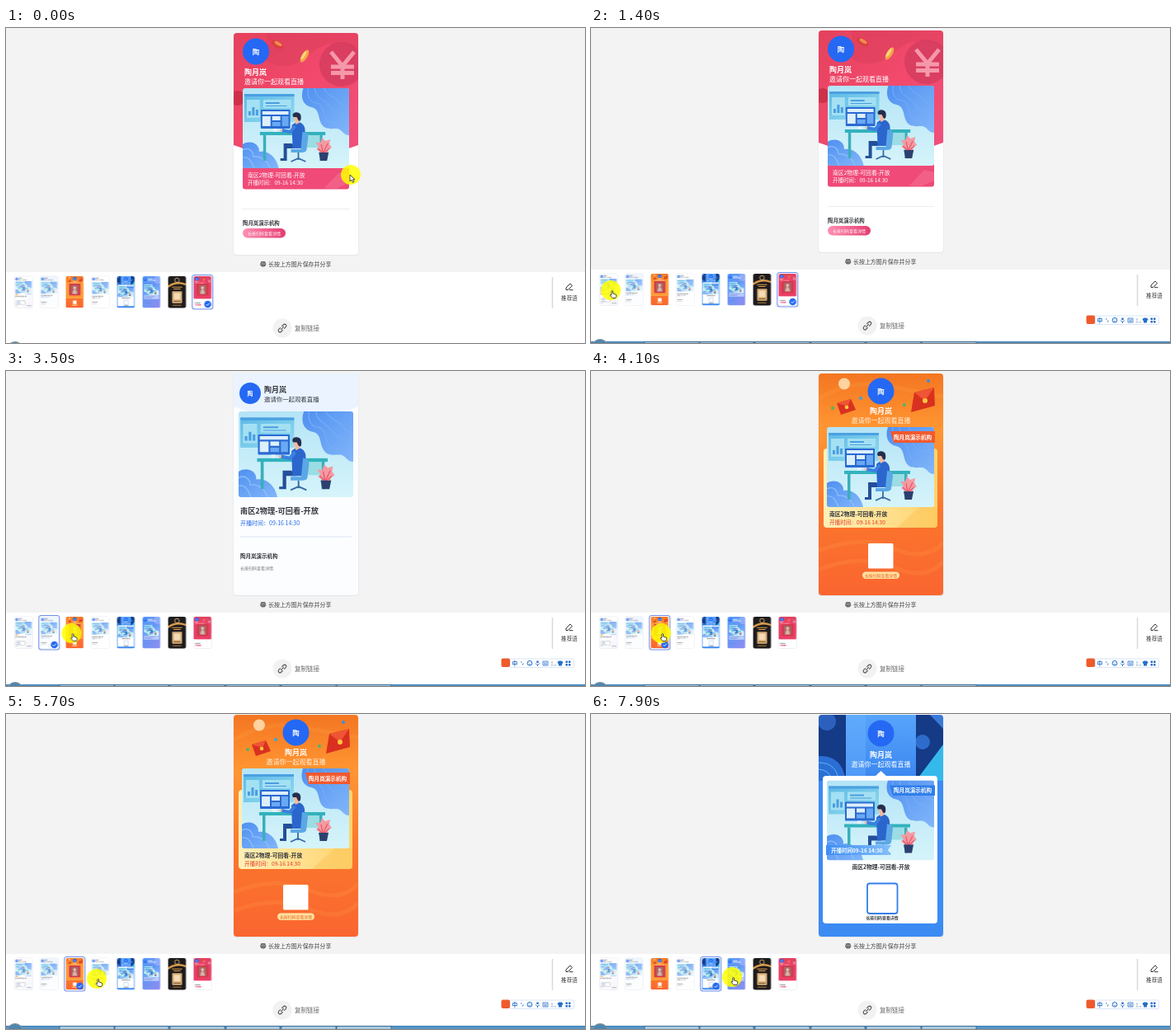
Animation, 702 px wide and 382 px high, one loop 8000 ms. Source, as an HTML page:

```html
<!DOCTYPE html>
<html lang="zh-CN">
<head>
<meta charset="utf-8">
<title>海报分享</title>
<style>
html, body { margin: 0; width: 100%; height: 100%; overflow: hidden; background: #fff; }
#stage { display: block; width: 702px; height: 382px; }
text { font-family: "Noto Sans CJK SC", "Noto Sans CJK", "Noto Sans", sans-serif; }
.b { font-weight: 700; }
.mid { text-anchor: middle; }
.w { fill: #fff; }
.ink { fill: #33353c; }
.page, .reel, .ring, .bar, .cur, .arrow, .hand, .click { animation: 8s step-end infinite; }
.page { animation-name: page; }
.reel { animation-name: reel; }
.ring { animation-name: ring; }
.bar { animation-name: bar; }
.arrow { animation-name: arrow; }
.hand { animation-name: hand; }
.click { animation-name: click; }
.cur { animation-name: cur; animation-timing-function: ease-in-out; }
@keyframes page {
  0% { transform: translateY(3px); }
  7% { transform: translateY(1px); }
  14% { transform: translateY(0); }
  62%, 100% { transform: translateY(-2px); }
}
@keyframes reel {
  0% { transform: translateX(0); }
  20% { transform: translateX(-200px); }
  37% { transform: translateX(-400px); }
  48.75% { transform: translateX(-600px); }
  73% { transform: translateX(-800px); }
  84%, 100% { transform: translateX(-1000px); }
}
@keyframes ring {
  0% { transform: translateX(238.3px); }
  20% { transform: translateX(21.3px); }
  37% { transform: translateX(52.3px); }
  48.75% { transform: translateX(83.3px); }
  73% { transform: translateX(114.3px); }
  84%, 100% { transform: translateX(145.3px); }
}
@keyframes bar { 0% { opacity: 0; } 8%, 100% { opacity: 1; } }
@keyframes arrow { 0% { opacity: 1; } 15%, 100% { opacity: 0; } }
@keyframes hand { 0% { opacity: 0; } 15%, 100% { opacity: 1; } }
@keyframes click {
  0%, 20.5%, 36.8%, 48.7%, 74%, 84% { opacity: 0; }
  18.5%, 34.4%, 46.7%, 72%, 82.2% { opacity: 1; }
  100% { opacity: 0; }
}
@keyframes cur {
  0%, 2% { transform: translate(418px, 178px); }
  16%, 21% { transform: translate(24px, 318px); }
  33%, 38% { transform: translate(51px, 318px); }
  46%, 64% { transform: translate(85px, 318px); }
  70%, 74% { transform: translate(110px, 321px); }
  82%, 94.5% { transform: translate(145px, 320px); }
  98%, 100% { transform: translate(171px, 319px); }
}
</style>
</head>
<body>
<svg id="stage" viewBox="0 0 702 382" width="702" height="382">
<defs>
  <linearGradient id="sky" x2="0" y2="1"><stop stop-color="#b4e4f7"/><stop offset="1" stop-color="#d6f4fa"/></linearGradient>
  <linearGradient id="blob" x2="1" y2="1"><stop stop-color="#4f90f0"/><stop offset="1" stop-color="#82b6fa"/></linearGradient>
  <linearGradient id="board" x2="1" y2="1"><stop stop-color="#5db9e6"/><stop offset="1" stop-color="#93dcef"/></linearGradient>
  <linearGradient id="rose" x2="1" y2="1"><stop stop-color="#e5415c"/><stop offset=".5" stop-color="#f2496c"/><stop offset="1" stop-color="#f0507c"/></linearGradient>
  <linearGradient id="pill"><stop stop-color="#ff8fb3"/><stop offset="1" stop-color="#e53b70"/></linearGradient>
  <linearGradient id="pale" x2="1" y2="1"><stop stop-color="#fbfbff"/><stop offset=".5" stop-color="#fff"/><stop offset="1" stop-color="#f0f0fc"/></linearGradient>
  <linearGradient id="sun" x2="0" y2="1"><stop stop-color="#f47622"/><stop offset=".25" stop-color="#ff9632"/><stop offset=".62" stop-color="#fb762c"/><stop offset="1" stop-color="#fa6530"/></linearGradient>
  <linearGradient id="gold" x2="1"><stop stop-color="#fff0b8"/><stop offset="1" stop-color="#ffd36c"/></linearGradient>
  <linearGradient id="blue" x2="0" y2="1"><stop stop-color="#57a4fb"/><stop offset="1" stop-color="#3a86f0"/></linearGradient>
  <linearGradient id="tag"><stop stop-color="#3d8df5"/><stop offset="1" stop-color="#83bffb"/></linearGradient>
  <linearGradient id="iris" x2="1" y2="1"><stop stop-color="#4f9bf8"/><stop offset="1" stop-color="#8f8df0"/></linearGradient>
  <linearGradient id="task" x2="0" y2="1"><stop stop-color="#3f7fb2"/><stop offset=".3" stop-color="#5b9aca"/><stop offset="1" stop-color="#2c6a9f"/></linearGradient>
  <clipPath id="card"><rect width="151" height="269" rx="4"/></clipPath>
  <clipPath id="thumb"><rect width="151" height="269" rx="16"/></clipPath>
  <clipPath id="frame"><rect width="130" height="97" rx="3"/></clipPath>

  <symbol id="art" viewBox="0 0 130 97" preserveAspectRatio="none">
   <g clip-path="url(#frame)">
    <rect width="130" height="97" fill="url(#sky)"/>
    <path d="M74 0C70 12 74 21 84 23C93 25 92 33 95 41C99 51 108 49 114 49C122 49 122 57 130 57V0Z" fill="url(#blob)"/>
    <path d="M80 0C78 12 84 18 91 18C100 20 97 32 103 39C109 46 119 40 130 48M88 0C88 12 100 13 106 22C112 32 121 28 130 36M99 0C102 9 114 10 118 17S126 23 130 23" fill="none" stroke="#78aef7" stroke-width="1"/>
    <path d="M0 68C10 62 21 68 20 77C33 75 42 86 44 97H0Z" fill="url(#blob)"/>
    <path d="M0 75C8 71 13 77 13 83C24 82 31 90 33 97M0 84Q9 82 14 97" fill="none" stroke="#8fbffa" stroke-width="1.2"/>
    <rect x="2" y="7" width="61" height="34" fill="url(#board)"/>
    <path d="M2 7H63V10H2Z" fill="#4ba0e2"/>
    <path d="M5 14H21V36H5ZM25 14H59V24H25Z" fill="#a4e0f3"/>
    <path d="M7 33V28h3v5ZM11.500 33V23h3v10ZM16 33V26h3v7ZM28 17H45V19H28ZM28 21H54V22H28Z" fill="#4a9ee0"/>
    <rect x="22" y="26" width="36" height="23" rx="1" fill="#2b6ad2"/>
    <path d="M24 28H56V32H24ZM24 34H34V46H24ZM36 34H46V39H36Z" fill="#dceffc"/>
    <path d="M36 41H46V46H36ZM48 34H56V46H48Z" fill="#69a9f3"/>
    <path d="M37 49H42V53H47V54H32V53H37Z" fill="#e3f1fa"/>
    <path d="M25 57H28.500V88H25ZM94 57H97.500V88H94Z" fill="#3aaebb"/>
    <path d="M78 57H94V72H78Z" fill="#9bdde4"/>
    <rect x="21" y="53" width="80" height="4" fill="#32b2bd"/>
    <path d="M68 78V87M59 89L68 85L77 89" fill="none" stroke="#376ba5" stroke-width="1.8"/>
    <path d="M60 67H50V85H46V88H54V73H66Z" fill="#244f9a"/>
    <path d="M60 45C65 39 74 40 76 49L77 73H61Z" fill="#2b66cd"/>
    <path d="M64 46L58 53L48 51" fill="none" stroke="#3b80e2" stroke-width="4"/>
    <circle cx="47" cy="51" r="1.600" fill="#f3b8a0"/>
    <path d="M62 35H69V42L65 44Z" fill="#f3b8a0"/>
    <path d="M61 33C61 28 70 28 71 33C72 39 70 41 68 39L66 35H62Z" fill="#252e4e"/>
    <path d="M73 53Q80 53 80 59L78 75Q77 78 72 78H59V74H71Z" fill="#5ba7e6"/>
    <path d="M98 80L90 74L93 71L89 66L95 66L97 60L101 64L107 62L106 68L109 72L104 75L105 79Z" fill="#f59aa2"/>
    <path d="M98 79L96 68M98 79L104 67M98 79L92 73M99 79L106 73" stroke="#e8596b" stroke-width="1.300"/>
    <path d="M93 78H105L103 88H95Z" fill="#2c4070"/>
   </g>
  </symbol>

  <g id="face"><circle r="16" fill="#2468f4"/><text class="b w mid" y="3.100" font-size="8.500">陶</text></g>

  <g id="p8" clip-path="url(#card)">
    <rect width="151" height="269" fill="#fff"/>
    <path d="M0 0H151V136Q76 166 0 136Z" fill="url(#rose)"/>
    <path d="M40 0H151V22Q118 2 92 26T40 34Z" fill="#d03a58" opacity=".35"/>
    <circle cx="131" cy="38" r="27" fill="#d63d60" opacity=".85"/>
    <path d="M118 23L132 40L146 23M132 39V56M118 41H146M118 48.500H146" fill="none" stroke="#f598aa" stroke-width="5"/>
    <circle cx="5" cy="79" r="9" fill="#cf3049"/>
    <ellipse cx="53" cy="14" rx="8" ry="4" fill="#d8403f" transform="rotate(30 53 14)"/>
    <ellipse cx="54" cy="13" rx="5" ry="2" fill="#f08c50" transform="rotate(30 54 13)"/>
    <ellipse cx="86" cy="28" rx="8.500" ry="3.500" fill="#f2a648" transform="rotate(-58 86 28)"/>
    <ellipse cx="85" cy="27" rx="6" ry="1.700" fill="#ffd477" transform="rotate(-58 85 27)"/>
    <use href="#face" x="27" y="22.500"/>
    <text class="b w" x="13" y="50.500" font-size="9">陶月岚</text>
    <text class="w" x="13" y="62" font-size="8">邀请你一起观看直播</text>
    <path d="M11 160H140V186.500Q140 189.500 137 189.500H14Q11 189.500 11 186.500Z" fill="#f04a78"/>
    <use href="#art" x="11" y="67" width="129" height="97"/>
    <path d="M110 188L128 169L140 172V182L124 189Z" fill="#f98aa3" opacity=".35"/>
    <text class="w" x="17" y="174.800" font-size="6.800">南区2物理-可回看-开放</text>
    <text class="w" x="17" y="184.200" font-size="6.500">开播时间：09-16 14:30</text>
    <path d="M11 213.500H140" stroke="#e3e5ea" stroke-width=".7"/>
    <text class="b ink" x="11" y="232.500" font-size="6.400">陶月岚演示机构</text>
    <rect x="11" y="237" width="52" height="11.500" rx="5.700" fill="url(#pill)"/>
    <text class="w mid" x="37" y="244.600" font-size="5">长按扫码查看详情</text>
  </g>

  <g id="p1" clip-path="url(#card)">
    <rect width="151" height="269" fill="url(#pale)"/>
    <path d="M0 160Q12 190 0 215ZM151 140Q112 180 151 205Z" fill="#f3f4fd"/>
    <use href="#face" transform="translate(18.500 24) scale(.81)"/>
    <text class="b ink" x="34.500" y="23" font-size="9">陶月岚</text>
    <text class="ink" x="34.500" y="33.700" font-size="7.400">邀请你一起观看直播</text>
    <use href="#art" x="6" y="42" width="139" height="104"/>
    <rect x="6" y="150.500" width="23.500" height="8.500" rx="1" fill="#fb8b1e"/>
    <text class="b w" x="8.500" y="156.800" font-size="5.500">• LIVE</text>
    <text class="b" x="145" y="156.900" font-size="4.800" fill="#2d6ce0" text-anchor="end">来自「陶月岚演示机构」</text>
    <text class="b ink" x="6" y="175.300" font-size="9.200">南区2物理-可回看-开放</text>
    <path d="M13 207H86L90 211V237L87 240" fill="none" stroke="#222" stroke-width="1.200"/>
    <path d="M13 209.500H85L87.500 212V238L85 241H14L10 244V212Z" fill="#fff" stroke="#222"/>
    <text class="b" x="17" y="223.300" font-size="7.500" fill="#2468e8">开播时间：</text>
    <text class="b ink" x="17" y="234.400" font-size="6.500">09-16 14:30</text>
    <path d="M17 250.500H92" stroke="#dfe1e8"/>
    <path d="M17 250.500H28.500" stroke="#222" stroke-width="1.600"/>
    <circle cx="12.500" cy="250.500" r="2.800" fill="#fff" stroke="#222"/><circle cx="12.500" cy="250.500" r="1" class="ink"/>
    <text class="b ink mid" x="122" y="252.400" font-size="4.900">长按扫码查看详情</text>
  </g>

  <g id="p2" clip-path="url(#card)">
    <rect width="151" height="269" fill="#fbfdff"/>
    <path d="M0 0H151V40Q80 70 0 40Z" fill="#eaf3ff"/>
    <use href="#face" transform="translate(20 24) scale(.81)"/>
    <text class="b ink" x="37" y="23" font-size="9">陶月岚</text>
    <text class="ink" x="37" y="34" font-size="7.400">邀请你一起观看直播</text>
    <use href="#art" x="6" y="46" width="139" height="104"/>
    <text class="b ink" x="8" y="170" font-size="9.200">南区2物理-可回看-开放</text>
    <text x="8" y="184" font-size="7" fill="#2468e8">开播时间：09-16 14:30</text>
    <path d="M8 198H143" stroke="#dce6f5"/>
    <text class="b ink" x="8" y="224" font-size="6.500">陶月岚演示机构</text>
    <text x="8" y="238" font-size="5" fill="#777">长按扫码查看详情</text>
  </g>

  <g id="p3" clip-path="url(#card)">
    <rect width="151" height="269" fill="url(#sun)"/>
    <path d="M0 30Q40 8 75 14T151 28M0 215Q50 195 90 212T151 205M0 238Q50 218 90 235T151 228" fill="none" stroke="#ffab55" stroke-width="5" opacity=".15"/>
    <circle cx="31" cy="12.500" r="7" fill="#ffd2a0"/>
    <path d="M22 36L39 31L45 44L27 50ZM116 23L140 17L141 39L112 47Z" fill="#d9301f"/>
    <path d="M22 36L35 40L39 31ZM116 23L129 33L140 17Z" fill="#ef5534"/>
    <circle cx="34" cy="41" r="2.300" fill="#ffc543"/><circle cx="129" cy="33" r="3" fill="#ffc543"/>
    <circle cx="51" cy="30" r="2" fill="#36a7e0"/><circle cx="104" cy="38" r="2" fill="#4cb66c"/>
    <circle cx="133" cy="9" r="2" fill="#398de0"/><circle cx="17" cy="42" r="2" fill="#4cb66c"/>
    <use href="#face" x="75.500" y="21.500"/>
    <text class="b w mid" x="75.500" y="48.500" font-size="9">陶月岚</text>
    <text class="mid" x="75.500" y="60" font-size="8" fill="#fff0dc">邀请你一起观看直播</text>
    <rect x="6" y="91" width="138" height="96" rx="4" fill="url(#gold)"/>
    <path d="M95 187L122 162H144V183Q144 187 140 187Z" fill="#fbbd50" opacity=".4"/>
    <use href="#art" x="10" y="65" width="130" height="97"/>
    <path d="M87 70H141V84H91Z" fill="#f2592e"/>
    <text class="b w" x="91" y="79.500" font-size="6.600">陶月岚演示机构</text>
    <text class="b ink" x="13" y="172.600" font-size="6.800">南区2物理-可回看-开放</text>
    <text x="13" y="182.500" font-size="6.600" fill="#e23a24">开播时间：09-16 14:30</text>
    <rect x="60" y="206" width="30.500" height="30.500" rx="1.500" fill="#fff"/>
    <rect x="53" y="240.500" width="45" height="8.500" rx="4.200" fill="#ffe3a2"/>
    <text class="mid" x="75.500" y="246.600" font-size="4.900" fill="#e8601f">长按扫码查看详情</text>
  </g>

  <g id="p4" clip-path="url(#card)">
    <rect width="151" height="269" fill="#fff"/>
    <use href="#face" transform="translate(19 24) scale(.81)"/>
    <text class="b ink" x="36" y="23" font-size="9">陶月岚</text>
    <text class="ink" x="36" y="34" font-size="7.400">邀请你一起观看直播</text>
    <use href="#art" x="6" y="48" width="139" height="104"/>
    <text class="b ink" x="7" y="172" font-size="9.200">南区2物理-可回看-开放</text>
    <text class="ink" x="7" y="186" font-size="7">开播时间：09-16 14:30</text>
    <path d="M7 198H144" stroke="#ccc" stroke-dasharray="2 2"/>
    <text class="b ink" x="7" y="226" font-size="6.500">陶月岚演示机构</text>
    <text x="7" y="239" font-size="5" fill="#777">长按扫码查看详情</text>
  </g>

  <g id="p5" clip-path="url(#card)">
    <rect width="151" height="269" fill="#3c8bf3"/>
    <path d="M0 0H33V80H0ZM118 0H151V80H118Z" fill="#153a86"/>
    <path d="M0 50Q28 48 33 80H0Z" fill="#2a6fd6"/>
    <path d="M0 58Q22 58 24 80M0 66Q14 67 16 80" fill="none" stroke="#68b2f4"/>
    <circle cx="10" cy="8" r="11" fill="#2b61bd"/>
    <circle cx="126" cy="33" r="9" fill="#2d6ccb"/>
    <path d="M151 36V80H118Z" fill="#35b9ed"/>
    <path d="M135 0H151V17Z" fill="#3979d9"/>
    <rect x="33" width="85" height="80" fill="url(#blue)"/>
    <path d="M33 0H57V80H33Z" fill="#6fb4ff" opacity=".4"/>
    <use href="#face" x="75.500" y="22.500"/>
    <text class="b w mid" x="75.500" y="51.700" font-size="9">陶月岚</text>
    <text class="w mid" x="75.500" y="62.800" font-size="8">邀请你一起观看直播</text>
    <path d="M9 74H69L75.500 68L82 74H140Q144 74 144 78V249Q144 253 140 253H9Q5 253 5 249V78Q5 74 9 74Z" fill="#fff"/>
    <use href="#art" x="10" y="79.500" width="130" height="97"/>
    <path d="M86 85.500H141V98H90Z" fill="#2f7eea"/>
    <text class="b w" x="91" y="94.200" font-size="6.600">陶月岚演示机构</text>
    <path d="M9 158H88L84 164L88 170H9Z" fill="url(#tag)"/>
    <text class="b w" x="15" y="166.600" font-size="6.500">开播时间09-16 14:30</text>
    <text class="b ink mid" x="75.500" y="187" font-size="6.800">南区2物理-可回看-开放</text>
    <rect x="59" y="204.500" width="36.500" height="36.500" rx="3" fill="#fff" stroke="#347fe9" stroke-width="1.800"/>
    <text class="b ink mid" x="77" y="248" font-size="4.900">长按扫码查看详情</text>
  </g>

  <g id="p6">
    <rect width="151" height="269" fill="url(#iris)"/>
    <circle cx="130" cy="30" r="35" fill="#a9c4ff" opacity=".5"/>
    <use href="#face" transform="translate(22 28) scale(.9)"/>
    <path d="M45 23H85M45 35H112" stroke="#fff" stroke-width="5"/>
    <use href="#art" x="11" y="70" width="129" height="92"/>
    <rect x="11" y="162" width="129" height="32" fill="#b9cdfb"/>
    <path d="M18 174H100M18 184H80M18 228H72" stroke="#6e83dc" stroke-width="4"/>
  </g>

  <g id="p7">
    <rect width="151" height="269" fill="#1d1b1c"/>
    <path d="M0 78Q75 30 151 62V78Q75 48 0 98Z" fill="#d99a4b"/>
    <circle cx="75" cy="34" r="19" fill="none" stroke="#e9c084" stroke-width="6"/>
    <path d="M32 92H119M45 108H106" stroke="#e2a152" stroke-width="7"/>
    <rect x="34" y="128" width="84" height="100" rx="6" fill="#d9b07a"/>
    <rect x="49" y="143" width="54" height="54" fill="#f3dcb6"/>
    <path d="M45 212H106" stroke="#6e4520" stroke-width="6"/>
    <path d="M38 246H113" stroke="#cf9148" stroke-width="6"/>
  </g>

  <g id="shot">
    <rect x="28" y="62" width="95" height="100" rx="6" fill="#d2384c"/>
    <path d="M44 75H107V150H44Z" fill="#ad6465"/>
    <path d="M55 150Q60 112 75 112T96 150Z" fill="#d9b4a9"/><circle cx="75" cy="98" r="13" fill="#e2c3b5"/>
  </g>
</defs>

<rect width="702" height="382" fill="#fff"/>
<g class="page">
  <rect y="-5" width="702" height="298" fill="#f3f3f3"/>
  <rect x="275.500" y="3" width="152" height="270" rx="4" fill="#e6e6e9"/>
  <svg x="276" y="3" width="151" height="269">
    <g class="reel">
      <use href="#p8"/><use href="#p1" x="200"/><use href="#p2" x="400"/>
      <use href="#p3" x="600"/><use href="#p4" x="800"/><use href="#p5" x="1000"/>
    </g>
  </svg>
  <path d="M309.500 282V280.500H314V282M308.800 282H314.700V285H308.800ZM310 284H313.500V286H310Z" fill="#aaa" stroke="#555" stroke-width=".8"/>
  <text x="318" y="285.600" font-size="6.950" fill="#444">长按上方图片保存并分享</text>

  <g stroke="#e3e7ee" stroke-width=".7" fill="#fff">
    <rect x="10.400" y="298" width="21.800" height="38.500" rx="2"/><rect x="41.400" y="298" width="21.800" height="38.500" rx="2"/>
    <rect x="103.400" y="298" width="21.800" height="38.500" rx="2"/><rect x="227.400" y="298" width="21.800" height="38.500" rx="2"/>
  </g>
  <g transform="translate(10.500 298) scale(.1432)">
    <g opacity=".75"><use href="#p1"/><use href="#p2" x="216.500"/><use href="#p4" x="649.500"/></g>
    <g transform="translate(433)" clip-path="url(#thumb)"><use href="#p3"/><rect y="62" width="151" height="125" fill="#fd9a36"/><use href="#shot"/></g>
    <g transform="translate(866)" clip-path="url(#thumb)"><use href="#p5"/></g>
    <g transform="translate(1082.500)" clip-path="url(#thumb)"><use href="#p6"/></g>
    <g transform="translate(1299)" clip-path="url(#thumb)"><use href="#p7"/></g>
    <g transform="translate(1515.500)" clip-path="url(#thumb)"><use href="#p8"/><rect y="62" width="151" height="128" fill="#ea3f66"/><use href="#shot"/></g>
  </g>
  <g class="ring">
    <rect x="-12.500" y="296.500" width="25" height="41.500" rx="3" fill="none" stroke="#6f8fea" stroke-width="1.100"/>
    <circle cx="6.300" cy="332" r="4.300" fill="#2468f2"/>
    <path d="M4.300 332L5.800 333.500L8.500 330.600" fill="none" stroke="#fff" stroke-width=".9"/>
  </g>

  <path d="M662.500 299V337" stroke="#d9d9d9" stroke-width="1.500"/>
  <path d="M679 314.500V312L684 307L686.500 309.500L681.500 314.500ZM683 314.700H687.500" fill="none" stroke="#333"/>
  <text class="mid" x="683" y="326.600" font-size="6.600" fill="#333">推荐语</text>

  <circle cx="335" cy="361" r="11.500" fill="#f2f2f2"/>
  <g transform="translate(335 361) rotate(-45)" fill="none" stroke="#555" stroke-width="1.100">
    <path d="M-1 -2H-4A2 2 0 0 0 -4 2H-1M1 -2H4A2 2 0 0 1 4 2H1M-2.500 0H2.500"/>
  </g>
  <text x="350" y="363.700" font-size="7.500" fill="#666">复制链接</text>

  <g class="bar">
    <rect x="611" y="349" width="77.500" height="10.500" rx="1.500" fill="#fff" stroke="#c9dcf2" stroke-width=".7"/>
    <rect x="600.500" y="348.500" width="10.500" height="10.500" rx="2" fill="#ef5a2c"/>
    <text class="b" x="613.500" y="356.900" font-size="6.800" fill="#2670c8">中</text>
    <g fill="none" stroke="#2670c8">
      <path d="M624 353H625.500M627 354.500L626.500 356.500"/>
      <circle cx="635" cy="354.300" r="2.900"/><path d="M633.600 355.200Q635 356.600 636.400 355.200M634 353V353.700M636 353V353.700" stroke-width=".7"/>
      <path d="M642 354.500Q644.500 358 647 354.500M644.500 356V358"/><path d="M644.500 351.500V354" stroke-width="2.400"/>
      <path d="M651 352H657V357H651ZM652 354H656M652.500 355.700H655.500" stroke-width=".8"/>
    </g>
    <path d="M661 352.500h2v2h-2ZM660 357.500l2-2.500l2 2.500ZM664.500 356h2.500v1.500h-2.500Z" fill="#b5c9df"/>
    <path d="M668.500 353L670.500 351.500H673.500L675.500 353L674.500 355H674V357.500H670V355H669.500ZM678.500 351.500h2.500v2.500h-2.500ZM682 351.500h2.500v2.500H682ZM678.500 355h2.500v2.500h-2.500ZM682 355h2.500v2.500H682Z" fill="#2670c8"/>
  </g>

  <rect y="380" width="702" height="8" fill="url(#task)"/>
  <g fill="#a9c8de" stroke="#24577f" stroke-width=".7">
    <path d="M65 380.500H131V390H65ZM132 380.500H197V390H132ZM199 380.500H265V390H199ZM267 380.500H332V390H267ZM334 380.500H400V390H334ZM401 380.500H467V390H401Z"/>
  </g>
  <circle cx="11" cy="387.500" r="10" fill="#4f86ad" stroke="#8a979f" stroke-width="1"/>
</g>

<circle class="cur" r="12" fill="#ff0" fill-opacity=".85"/>
<g class="cur">
  <path class="arrow" d="M-1 0V8L1 6.200L2.500 9.300L3.900 8.600L2.500 5.700H5Z" fill="#fff" stroke="#222" stroke-width=".8"/>
  <g class="hand">
    <path d="M.8 5V1Q1.700 -.3 2.500 1V4L6 5Q7 5.500 6.600 7.500L5.800 9.500H2L-1 6.200Q-.6 4.800 .8 6Z" fill="#fff" stroke="#222" stroke-width=".8"/>
    <circle class="click" cx="1.500" cy="1" r="3" fill="none" stroke="#f0312a" stroke-width="1.300"/>
  </g>
</g>
</svg>
</body>
</html>
```
